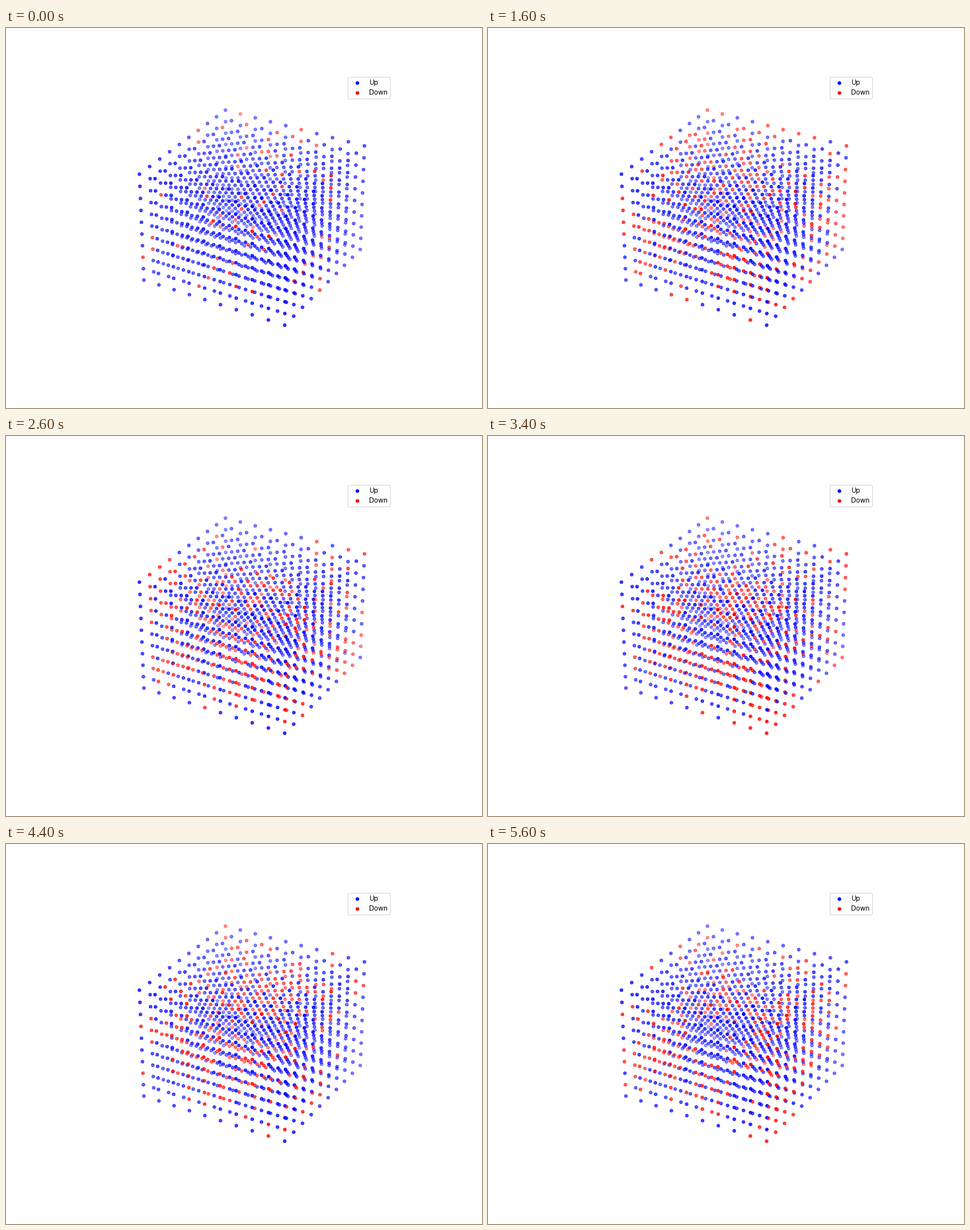
These frames come from a looping animation (720 by 576 pixels, 5.8 s). A matplotlib script:

```python
import numpy as np
import matplotlib.pyplot as plt
from matplotlib.animation import FuncAnimation
from matplotlib.colors import to_rgb

W, H, DPI = 720, 576, 72
N, FRAMES, INTERVAL = 10, 29, 200
TEMP, SEED = 4.7, 7
DIST, ELEV, AZIM = 10, np.radians(30), np.radians(-60)
COLORS = {1: "blue", -1: "red"}
LABELS = {1: "Up", -1: "Down"}


def project(sites):
    """Perspective view of the lattice: screen x, y and depth."""
    box = np.array([4, 4, 3]) * 1.8294640721620434 / np.sqrt(41)
    pos = (sites - (N - 1) / 2) / (1.1 * (N - 1)) * box
    ce, se, ca, sa = np.cos(ELEV), np.sin(ELEV), np.cos(AZIM), np.sin(AZIM)
    right = np.array([-sa, ca, 0])
    up = np.array([-se * ca, -se * sa, ce])
    toward = np.array([ce * ca, ce * sa, se])
    w = DIST - pos @ toward
    return np.column_stack([pos @ right / w, pos @ up / w]), -DIST / w


def sweep(spins, rng):
    """One Metropolis sweep of the Ising model with periodic borders."""
    s = spins.copy()
    for i, j, k in rng.integers(0, N, (N ** 3, 3)):
        near = (s[i - 1, j, k] + s[(i + 1) % N, j, k]
                + s[i, j - 1, k] + s[i, (j + 1) % N, k]
                + s[i, j, k - 1] + s[i, j, (k + 1) % N])
        cost = 2 * s[i, j, k] * near
        if cost <= 0 or rng.random() < np.exp(-cost / TEMP):
            s[i, j, k] *= -1
    return s


def simulate():
    """Heat an all-up lattice, one state per frame."""
    rng = np.random.default_rng(SEED)
    spins, states = np.ones((N, N, N), dtype=int), []
    for _ in range(FRAMES):
        spins = sweep(spins, rng)
        states.append(spins.ravel())
    return states


def shade(color, z):
    """Fade the colour with depth, from opaque to 30 %."""
    span = max(np.ptp(z), 1e-9)
    alpha = 1 - 0.7 * (z - z.min()) / span
    return np.column_stack([np.tile(to_rgb(color), (len(z), 1)), alpha])


fig = plt.figure(figsize=(W / DPI, H / DPI), dpi=DPI, facecolor="white")
side = 0.755 * H / W
ax = fig.add_axes([0.5125 - side / 2, 0.125, side, 0.755])
ax.axis("off")
dots = {s: ax.scatter([], [], s=20, color=COLORS[s], linewidths=1,
                      label=LABELS[s], clip_on=False) for s in COLORS}
ax.legend(loc="upper right", fontsize=10)
ax.set(xlim=(-0.095, 0.09), ylim=(-0.095, 0.09))

xy, depth = project(np.indices((N, N, N)).reshape(3, -1).T)
order = np.argsort(depth)[::-1]
states = simulate()


def draw(n):
    spins = states[n][order]
    for sign, dot in dots.items():
        pick = order[spins == sign]
        rgba = shade(COLORS[sign], depth[pick])
        dot.set_offsets(xy[pick])
        dot.set_facecolor(rgba)
        dot.set_edgecolor(rgba)
        # the colour of the nearest spin lies on top
        dot.set_zorder(2 if sign == spins[-1] else 1)
    return list(dots.values())


anim = FuncAnimation(fig, draw, frames=FRAMES, interval=INTERVAL,
                     repeat=True, repeat_delay=0, blit=False)
plt.show()
```
